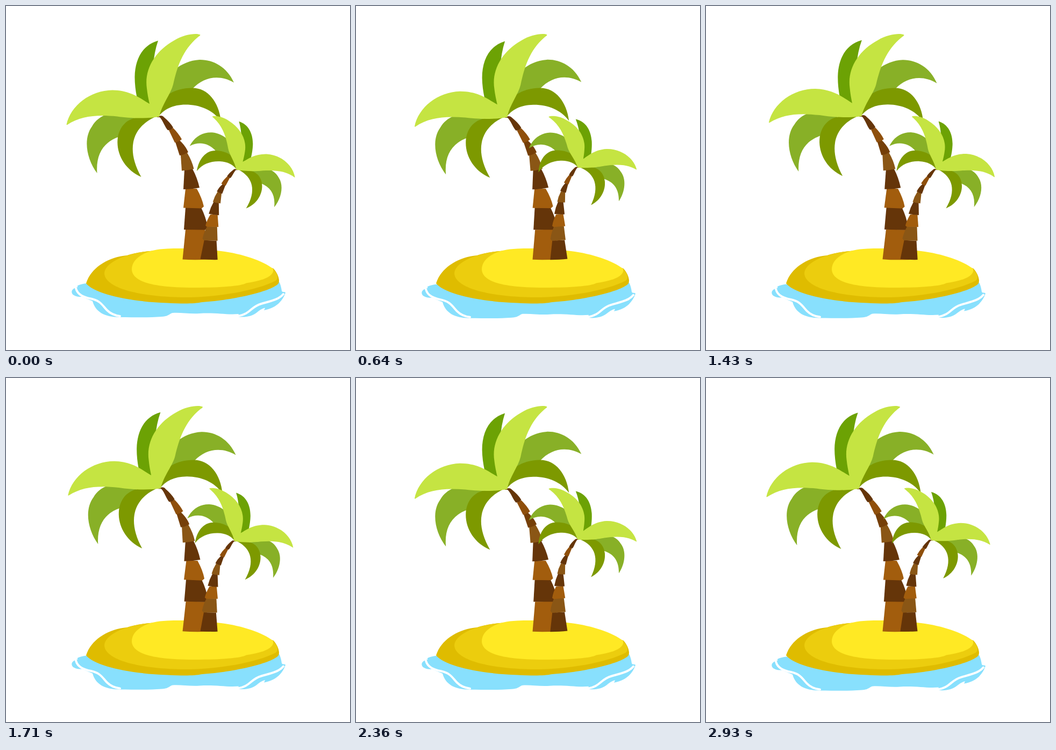
Recreate the animation shown at these times as an HTML page. Size 640 by 640 pixels, loop 3 s.

```html
<!DOCTYPE html>
<html lang="en">
<head>
<meta charset="utf-8">
<title>Palm island</title>
<style>
  html, body { margin: 0; width: 100%; height: 100%; overflow: hidden; background: #fff; }
  svg { display: block; width: 100%; height: 100%; }
  .lime { fill: #c5e442; }
  .leaf { fill: #6ca204; }
  .moss { fill: #88b027; }
  .olive { fill: #7d9900; }
  .foam { fill: none; stroke: #fff; stroke-width: 4; stroke-linecap: round; }
</style>
</head>
<body>
<svg viewBox="0 0 640 640">
  <defs>
    <g id="crown">
      <path class="moss" d="M169.5 311C150 285 143 247 160 224C166 213 176 206 185 202.5L240 208L211 243C181 253 167 276 169.5 311Z"/>
      <path class="olive" d="M251.5 318C222 305 206 277 207.5 250C209 228 222 210 246 207L276 207C236 226 222 265 251.5 318Z"/>
      <path class="leaf" d="M283 64.5C253 73 240 100 239.5 132C239.5 145 241 157 243.5 170L268 184L274 110C275 95 278 79 283 64.5Z"/>
      <path class="moss" d="M424 142.5C411 113 385 99.5 360 100C342 101 327 108 314 118L298 176L347 154C368 131 398 127 424 142.5Z"/>
      <path class="olive" d="M400 214.5C396 178 375 152 346 152.5C312 153 290 168 284 190L283 207C293 192 311 183.5 334 183.5C360 183.5 385 193 400 214.5Z"/>
      <path class="lime" d="M112.5 221C120 185 157 157 198 156.5C232 157 250 172 267 182C265 173 263 163 262 153C257 118 277 84 313 64C332 52 355 50 361.5 53.5C361 56 359 56 357 58C328 82 318 115 311 146C307 163 290 183 285 206C262 210 230 209 207 205.5C170 202 140 204 114 221Z"/>
    </g>
  </defs>

  <g id="water">
    <path fill="#88e0fd" d="M151 516C140 517 129 520 134 523C122 525 119 533 126 538C131 541 136 541 141 541L161 549C166 568 182 579 212 579C240 579 265 580 290 578C304 577 304 572 310 571C325 570 340 573 360 572C390 570 410 575 433 573L431 578C446 580 458 577 467 570C473 565 480 561 482 562L480 566C500 563 515 550 520 533C517 531 514 533 513 530C512 524 511 518 508 513L330 500Z"/>
    <path class="foam" d="M130 525C133 538 146 542 158 544.5C176 548 180 558 188 566C194 572 204 576 212 577"/>
    <path class="foam" d="M430 577C456 573 454 560 475 554C492 549 508 546 516 536"/>
  </g>

  <path fill="#dfbc00" d="M149 516C158 487 190 467 225 464C240 459 262 455 290 455L497 488C506 497 510 510 507 516C497 530 425 547 365 551C350 554 330 554 300 552.5C230 550 165 536 149 516Z"/>
  <path fill="#eccd0e" d="M183 497C184 478 222 458 280 455L497 490C506 498 507 506 502 511C465 530 390 543 325 542C235 540 183 521 183 497Z"/>
  <path fill="#ffe924" d="M234 490C234 470 258 453 300 451.5C335 450 370 452 400 456C440 461 478 474 497 489C500 503 477 511 447 515.5C438 521 400 524 350 524C270 524 235 512 234 490Z"/>

  <g id="tall">
    <g class="trunk"></g>
    <use href="#crown"/>
  </g>
  <g id="short">
    <g transform="rotate(-.6 376 474) translate(602.5 171.5) scale(-.636 .636)">
      <g class="trunk"></g>
      <use href="#crown"/>
    </g>
  </g>
</svg>
<script>
  const LOOP = 3000, FPS = 14;
  const water = document.getElementById('water');
  const tall = document.getElementById('tall');
  const short = document.getElementById('short');

  // Trunk pieces from the ground up
  const pieces = [
    'M334 416H370L379 471.5Q350 473 328.5 471.5Z',
    'M334 375H363Q372 393 375 411L371 416.5L331 416Z',
    'M334 340H355Q365 358 368 373L364 376.5L330 375.5Z',
    'M332 305L347 303Q356 320 360 338Q346 341 330 341Z',
    'M325 277L337 273Q346 288 349.5 303Q339 306 327 306.5Z',
    'M315 253L323 250Q334 260 339 272Q331 277 323 278Z',
    'M303 231L311 227Q321 237 327 248Q321 253 314 254Z',
    'M280 207C286 203 291 203 294 207C301 213 307 219 311 226Q308 231 301 231C296 226 292 213 286 207Z'
  ];
  const dark = '#653509', umber = '#753f08', bark = '#8f4f0b', tan = '#8a5615', rust = '#a25d0d';
  const barks = [
    [rust, dark, rust, dark, tan, umber, bark, dark],
    [dark, tan, rust, dark, tan, dark, bark, dark]
  ];
  document.querySelectorAll('.trunk').forEach((g, n) => {
    g.innerHTML = pieces.map((d, i) => `<path d="${d}" fill="${barks[n][i]}"/>`).join('');
  });

  // Eased value through evenly spaced keys
  function track(keys, gap, t) {
    const i = Math.min(Math.floor(t / gap), keys.length - 2);
    const u = t / gap - i;
    return keys[i] + (keys[i + 1] - keys[i]) * u * u * (3 - 2 * u);
  }

  const tilt = (el, deg, x, y) => el.setAttribute('transform', `rotate(${deg} ${x} ${y})`);

  function draw(ms) {
    // The motion runs on steps of 1/14 s; cut times are rounded down to 10 ms
    const t = Math.floor((ms + 5) * FPS / 1000) * 1000 / FPS % LOOP;
    tilt(tall, track([0, -1.03, 0, 1.03, 0, -1.03, 0], 500, t), 350, 472);
    tilt(short, track([3, -3, 0, 3, 0, -3, 0], 500, t), 376, 474);
    water.setAttribute('transform', `translate(0 ${track([0, 2.6, 0, 2.6], 1000, t)})`);
  }

  const start = performance.now();
  function tick() {
    draw((performance.now() - start) % LOOP);
    requestAnimationFrame(tick);
  }
  tick();
</script>
</body>
</html>
```
